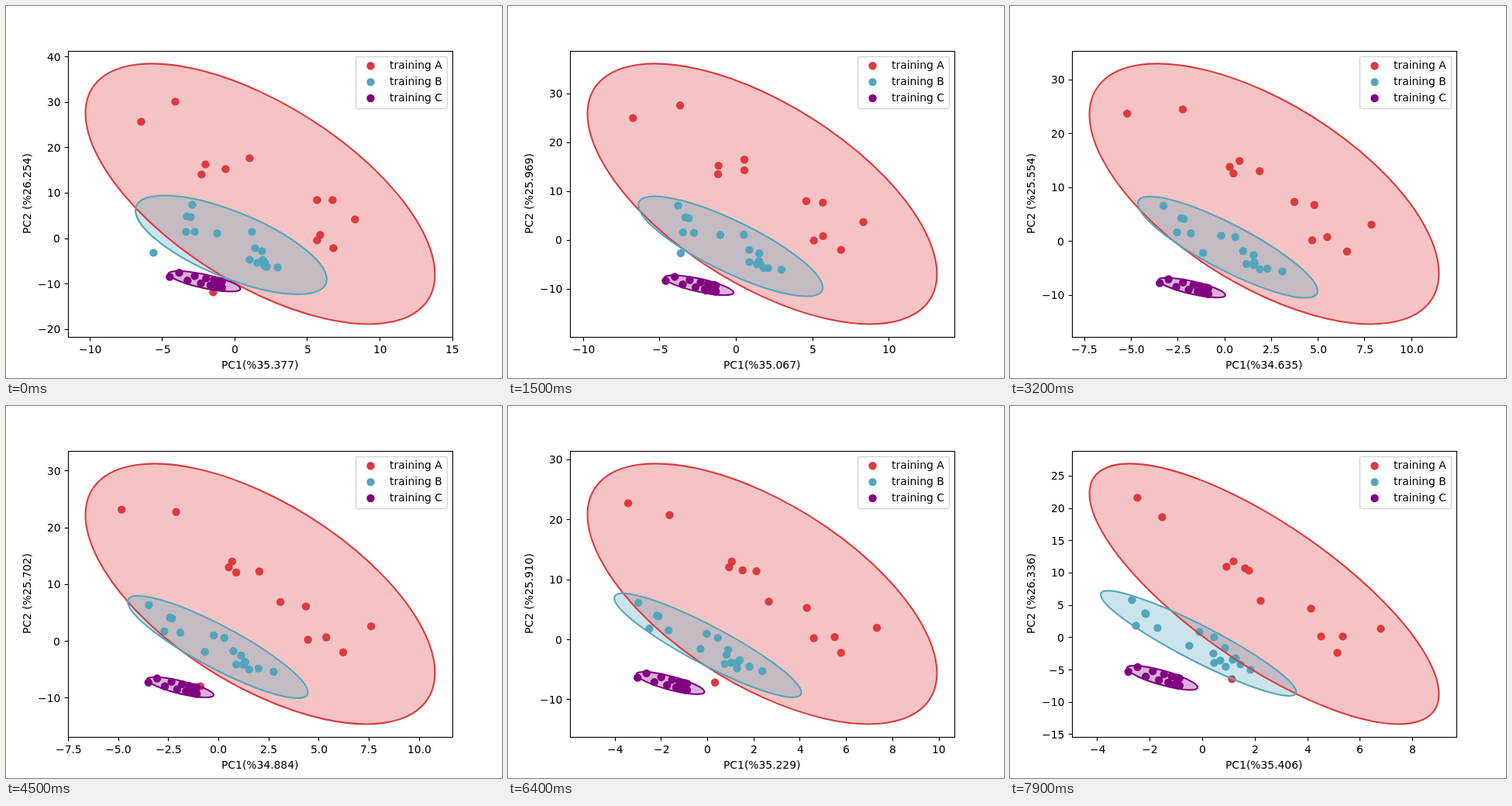
Animation of 640 by 480 pixels, one loop 8 s. Source, as an HTML page:

```html
<!DOCTYPE html>
<html lang="en">
<head>
<meta charset="utf-8">
<title>PCA scatter</title>
<style>
  html, body { margin: 0; width: 100%; height: 100%; overflow: hidden; background: #fff; }
  svg { display: block; width: 640px; height: 480px; }
  text { font: 13.889px "DejaVu Sans", sans-serif; }
</style>
</head>
<body>
<svg id="stage" viewBox="0 0 640 480"></svg>
<script>
const LOOP = 8000, STEP = 100, LAST = 79;
const BOX = { left: 80, right: 576, top: 57.6, bottom: 427.2 };
const RADIUS = 5.2;
const stage = document.getElementById('stage');

function set(node, attrs) {
  for (const name in attrs) node.setAttribute(name, attrs[name]);
}
function add(parent, tag, attrs) {
  const node = document.createElementNS('http://www.w3.org/2000/svg', tag);
  set(node, attrs);
  parent.appendChild(node);
  return node;
}

// Straight way from a to b for p in 0..1, bowed out by bend halfway.
const path = (a, b, bend, p) => a + (b - a) * p + bend * Math.sin(Math.PI * p);

// Values at a few steps, linear in between.
const KEY_STEPS = [0, 15, 32, 45, 57, 70, 79];
function keyed(values, step) {
  const i = Math.max(1, KEY_STEPS.findIndex(s => s >= step));
  const k = (step - KEY_STEPS[i - 1]) / (KEY_STEPS[i] - KEY_STEPS[i - 1]);
  return values[i - 1] + (values[i] - values[i - 1]) * k;
}
const PC1 = [35.377, 35.067, 34.635, 34.884, 34.899, 35.511, 35.406];
const PC2 = [26.254, 25.969, 25.554, 25.702, 25.608, 26.168, 26.336];
const ZERO_X = [295.4, 294.5, 277, 274.4, 263.4, 252.4, 248.4];
const UNIT_X = [18.71, 19.73, 24.11, 25.86, 27.85, 31.6, 33.9];
const UNIT_Y = [5.86, 6.3, 6.955, 7.325, 7.55, 7.91, 8.34];

// Dots run from x, y to x, y; the fifth number bows the way sideways.
const dotsA = [
  [174, 149, 164, 118, -20], [218, 123, 196, 143, 14], [257, 204, 279, 207, 18], [252, 217, 303, 209, 16],
  [283, 210, 308, 212, 30], [314, 196, 288, 200, -8], [401, 250, 323, 251, -3], [421, 250, 388, 261, -16],
  [450, 275, 478, 287, 5], [405, 295, 429, 297, -6], [401, 302, 401, 297, -12], [422, 312, 422, 318, 13],
  [267, 369, 286, 352, -28]
];
const dotsB = [
  [240, 256, 157, 250, -9], [233, 271, 174, 267], [238, 272, 175, 268], [232, 291, 162, 283],
  [243, 291, 190, 286], [272, 293, 244, 291], [317, 291, 263, 298, -5], [321, 312, 277, 312, -3],
  [330, 316, 262, 319], [314, 327, 263, 331], [324, 331, 271, 328], [331, 327, 291, 325, 0],
  [334, 331, 287, 327, 0], [333, 335, 278, 336], [336, 336, 297, 333], [350, 337, 310, 340, 18],
  [190, 318, 231, 309, 44]
];

const walk = (dots, bendX, bendY) => p => dots.map(([x0, y0, x1, y1, bend = bendX]) =>
  [path(x0, x1, bend, p), path(y0, y1, bendY, p)]);

// A string of dots along the ellipse, alternating sides and denser towards the right.
function cluster(p, { cx, cy, w, h, r }) {
  return Array.from({ length: 15 }, (_, i) => {
    const u = .48 - 1.45 * (1 - i / 14) ** 2.7;
    const v = r * u + (i % 2 ? -.35 : .25);
    return [cx + u * w, cy + v * h];
  });
}

// Ellipses: centre, half width, half height and correlation.
const groups = [
  {
    color: '#dc3a3e',
    ellipse: p => ({ cx: 328, cy: 242.4, w: 225.45, h: 168, r: .62 - .025 * p + .175 * p ** 14 }),
    dots: walk(dotsA, 0, 2)
  },
  {
    color: '#53a5bc',
    ellipse: p => ({
      cx: path(290.5, 243.2, 10, p), cy: path(308.2, 306.2, 4, p),
      w: path(123.5, 126.2, -9, p), h: path(63.7, 67.8, 0, p), r: .7 + .225 * p ** .35
    }),
    dots: walk(dotsB, 12, 4)
  },
  {
    color: '#800080',
    ellipse: p => ({
      cx: path(256, 196.5, 3, p), cy: path(355.2, 350.7, 10.5, p),
      w: path(46.5, 45.5, -3, p), h: path(13.2, 15.7, -1.5, p), r: .73 + .06 * p
    }),
    dots: cluster
  }
];

// Fills and dots lie in group order; all outlines lie above them.
const body = add(stage, 'g', {}), outlines = add(stage, 'g', {});
for (const group of groups) {
  const { color } = group;
  group.marks = group.dots(0, group.ellipse(0)).map(() => add(body, 'circle', { r: RADIUS, fill: color }));
  group.fill = add(body, 'circle', { r: 1, fill: color, 'fill-opacity': .3 });
  group.line = add(outlines, 'circle', {
    r: 1, fill: 'none', stroke: color, 'stroke-width': 2.08, 'vector-effect': 'non-scaling-stroke'
  });
}

// Text whose left end sits on a whole pixel; align 0, .5 or 1 is left, middle or right.
function write(node, content, x, y, align) {
  node.textContent = content;
  const left = Math.round(x - align * node.getComputedTextLength());
  set(node, { x: left, y: Math.round(y) });
}

const ticks = add(stage, 'g', {});
add(stage, 'rect', { x: 80.5, y: 58.5, width: 496, height: 369, fill: 'none', stroke: '#000', 'stroke-width': 1.11 });
const xTitle = add(stage, 'text', {});
const yTitle = add(stage, 'text', { transform: 'translate(32 242) rotate(-90)' });

add(stage, 'rect', {
  x: 451.5, y: 65.5, width: 118, height: 67, rx: 2.8,
  fill: '#fff', 'fill-opacity': .8, stroke: '#ccc', 'stroke-opacity': .8, 'stroke-width': 1.39
});
groups.forEach(({ color }, i) => {
  const y = 77.2 + i * 20.9;
  add(stage, 'circle', { cx: 470.5, cy: y, r: RADIUS, fill: color });
  write(add(stage, 'text', {}), 'training ' + 'ABC'[i], 495, y + 4, 0);
});

// Smallest round step that leaves at most nine intervals.
function tickStep(range) {
  const raw = range / 9, power = 10 ** Math.floor(Math.log10(raw));
  return power * [1, 2, 2.5, 5, 10].find(s => s * power >= raw);
}

function drawTicks(zero, unit, from, to, place) {
  const min = (from - zero) / unit, max = (to - zero) / unit;
  const step = tickStep(max - min);
  for (let n = Math.ceil(min / step - .01); n * step <= max + .01 * step; n++) {
    const label = (n * step).toFixed(step % 1 ? 1 : 0).replace('-', '\u2212');
    place(zero + n * step * unit, label);
  }
}

function tickLine(x1, y1, x2, y2) {
  add(ticks, 'line', { x1, y1, x2, y2, stroke: '#000', 'stroke-width': 1.11 });
}
const snap = v => Math.floor(v) + .5;

function drawAxes(step, p) {
  ticks.replaceChildren();
  drawTicks(keyed(ZERO_X, step), keyed(UNIT_X, step), BOX.left, BOX.right, (x, label) => {
    tickLine(snap(x), 427.5, snap(x), 432.4);
    write(add(ticks, 'text', {}), label, x, 448, .5);
  });
  drawTicks(path(300, 298.8, 4.5, p), -keyed(UNIT_Y, step), BOX.bottom, BOX.top, (y, label) => {
    tickLine(75.6, snap(y), 80.5, snap(y));
    write(add(ticks, 'text', {}), label, 70.3, y + 5, 1);
  });
  write(xTitle, `PC1(%${keyed(PC1, step).toFixed(3)})`, 328, 468, .5);
  write(yTitle, `PC2 (%${keyed(PC2, step).toFixed(3)})`, 0, 0, .5);
}

// Y runs downwards, so the vertical axis counts from the bottom with a negative unit.
function draw(time) {
  const step = Math.floor(time % LOOP / STEP), p = step / LAST;
  for (const { ellipse, dots, marks, fill, line } of groups) {
    const shape = ellipse(p), { cx, cy, w, h, r } = shape;
    const transform = `matrix(${w} ${r * h} 0 ${h * Math.sqrt(1 - r * r)} ${cx} ${cy})`;
    set(fill, { transform });
    set(line, { transform });
    dots(p, shape).forEach(([x, y], i) => set(marks[i], { cx: x + .4, cy: y + .4 }));
  }
  drawAxes(step, p);
}

let start;
function tick(now) {
  start ??= now;
  draw(now - start);
  requestAnimationFrame(tick);
}
draw(0);
requestAnimationFrame(tick);
</script>
</body>
</html>
```
